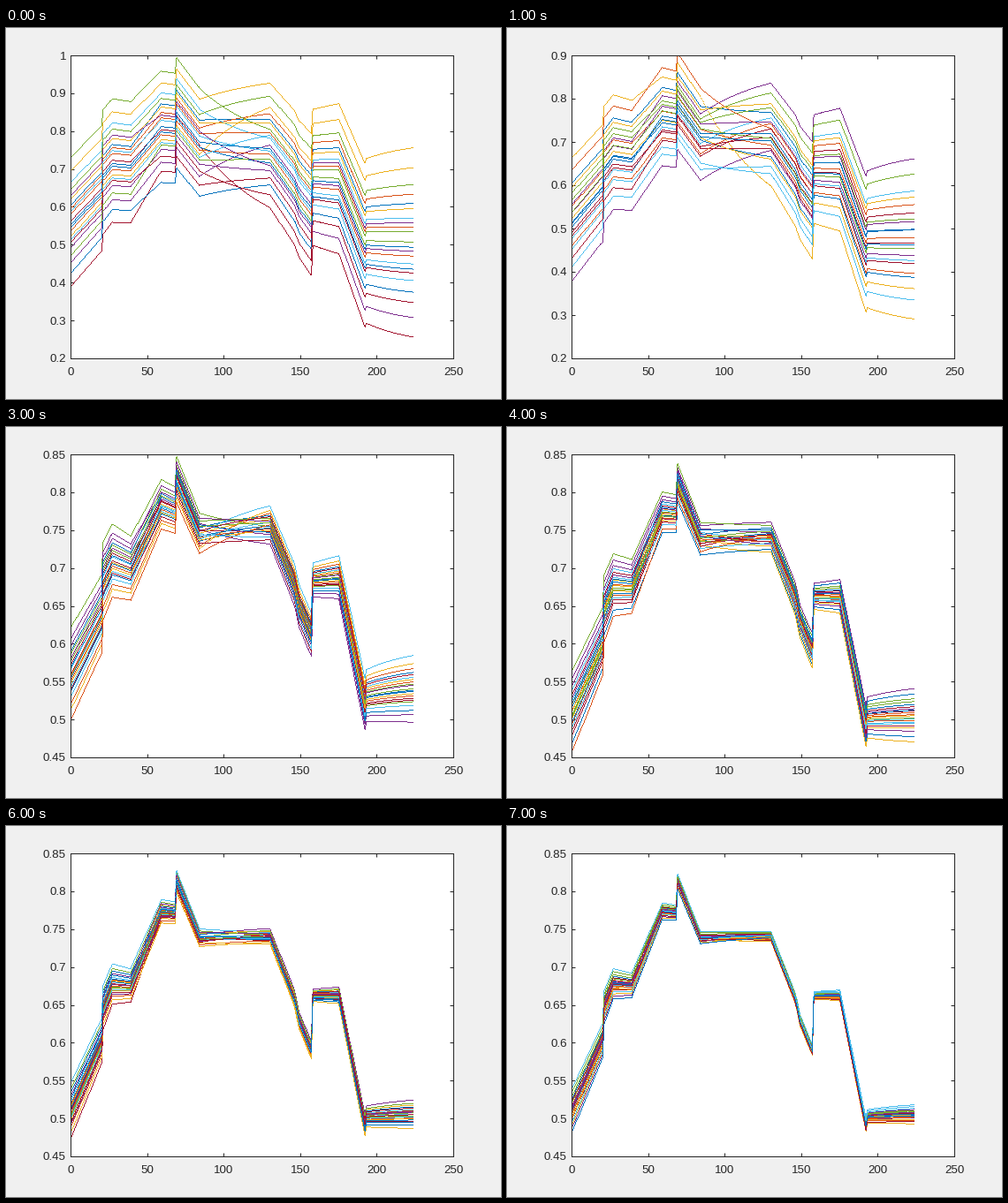
A matplotlib script that plays this animation: 560x420 px, repeating every 8 s.

```python
import numpy as np
import matplotlib.pyplot as plt
from matplotlib.animation import FuncAnimation

W, H, DPI = 560, 420, 100
BOX_W, BOX_H = 433, 343
PX = 72 / DPI
COUNT = 22
STEPS = 8
X_MAX = 250
INK = "#262626"
COLORS = ["#0072BD", "#D95319", "#EDB120", "#7E2F8E", "#77AC30", "#4DBEEE", "#A2142F"]

plt.rcParams["font.family"] = "Liberation Sans"

# The curve that the bundle settles on.
X = np.array([0, 20, 21, 27, 39, 59, 68, 69, 84, 130,
              146, 149, 157, 158, 175, 192, 193, 224])
Y = np.array([.51, .602, .646, .677, .675, .773, .771, .812, .738, .740,
              .658, .629, .59, .662, .662, .491, .502, .505])
BENDS = {8, 16}  # runs that ease instead of going straight

# Half the height of the bundle along x, at the start and at the end.
SPREAD_X = [0, 39, 59, 84, 130, 157, 158, 224]
SPREAD_START = [.17, .16, .147, .143, .164, .187, .18, .25]
SPREAD_END = [.029, .016, .011, .008, .0065, .0075, .005, .0125]

# How far the bundle has closed in at each step, from 0 to 1.
CLOSED = np.interp(range(STEPS), [0, 1, 2, 3, 5, 7], [0, .1, .43, .58, .73, 1])

# Early offsets of the whole bundle at left, peak and right.
LIFT_X = [0, 69, 224]
LIFTS = [(.05, .035, 0), (.01, -.02, -.03), (-.01, .01, .05), (.05, .004, .035)]

# Lines that lead on the left, lead on the right and trail on the right.
LEFT_TOP = [4, 2, 3, 4, 4, 4, 5, 5]
RIGHT_TOP = [2, 3, 4, 5, 3, 3, 3, 5]
RIGHT_LOW = [6, 2, 6, 3, 2, 2, 2, 2]

# Order of the lines shifts from the left one to the right one.
MIX = np.repeat([0, .2, .8, 1], [5, 4, 4, 5])


def axis_range(step):
    if step < 2:
        return .2, 1 - .1 * step, .1
    return (.4, .9, .05) if step == 2 else (.45, .85, .05)


def levels(step):
    """Place of each line in the bundle at each knot, from -1 to 1."""
    rng = np.random.default_rng(40 + step)
    left, right = rng.random((2, COUNT))
    left[LEFT_TOP[step]] = 1.2
    right[RIGHT_TOP[step]] = 1.2
    right[RIGHT_LOW[step]] = -.2
    u = np.linspace(-1, 1, COUNT)
    places = u * (.6 + .4 * u ** 4)  # dense core, a few outliers
    places[1:-1] += rng.uniform(-.03, .03, COUNT - 2)
    key = np.outer(left, 1 - MIX) + np.outer(right, MIX)
    return places[key.argsort(axis=0).argsort(axis=0)]


def bundle(step):
    closed = CLOSED[step]
    start = np.interp(X, SPREAD_X, SPREAD_START)
    end = np.interp(X, SPREAD_X, SPREAD_END)
    spread = start ** (1 - closed) * end ** closed
    lift = np.interp(X, LIFT_X, LIFTS[step]) if step < len(LIFTS) else 0
    return Y + lift + levels(step) * spread


def dots(values, height):
    """One point per pixel along the curve, for a crisp hairline."""
    xs, ys = [], []
    for k in range(len(X) - 1):
        dx, dy = X[k + 1] - X[k], values[k + 1] - values[k]
        n = int(np.ceil(max(dx * BOX_W / X_MAX, abs(dy) * BOX_H / height)))
        t = np.linspace(0, 1, n, endpoint=False)
        ease = (1 - np.exp(-t)) / (1 - np.exp(-1)) if k in BENDS else t
        xs.extend(X[k] + t * dx)
        ys.extend(values[k] + ease * dy)
    return xs, ys


fig = plt.figure(figsize=(W / DPI, H / DPI), dpi=DPI, facecolor="#F0F0F0")
ax = fig.add_axes([73 / W, 46 / H, BOX_W / W, BOX_H / H], facecolor="white")
ax.set_xlim(0, X_MAX)
ax.set_xticks(range(0, X_MAX + 1, 50))
ax.tick_params(direction="in", top=True, right=True, length=4 * PX, width=PX,
               color=INK, labelcolor=INK, labelsize=13.33 * PX)
ax.tick_params(axis="x", pad=10 * PX)
ax.tick_params(axis="y", pad=5 * PX)
for spine in ax.spines.values():
    spine.set(linewidth=PX, color=INK)

lines = [ax.plot([], [], ",", color=COLORS[i % len(COLORS)])[0] for i in range(COUNT)]


def draw(step):
    bottom, top, tick = axis_range(step)
    ticks = np.linspace(bottom, top, round((top - bottom) / tick) + 1)
    ax.set_ylim(bottom, top)
    ax.set_yticks(ticks, [f"{round(v, 2):g}" for v in ticks])
    for line, values in zip(lines, bundle(step)):
        line.set_data(*dots(values, top - bottom))
    return lines


anim = FuncAnimation(fig, draw, frames=STEPS, interval=1000,
                     repeat=True, repeat_delay=0, blit=False)
plt.show()
```
